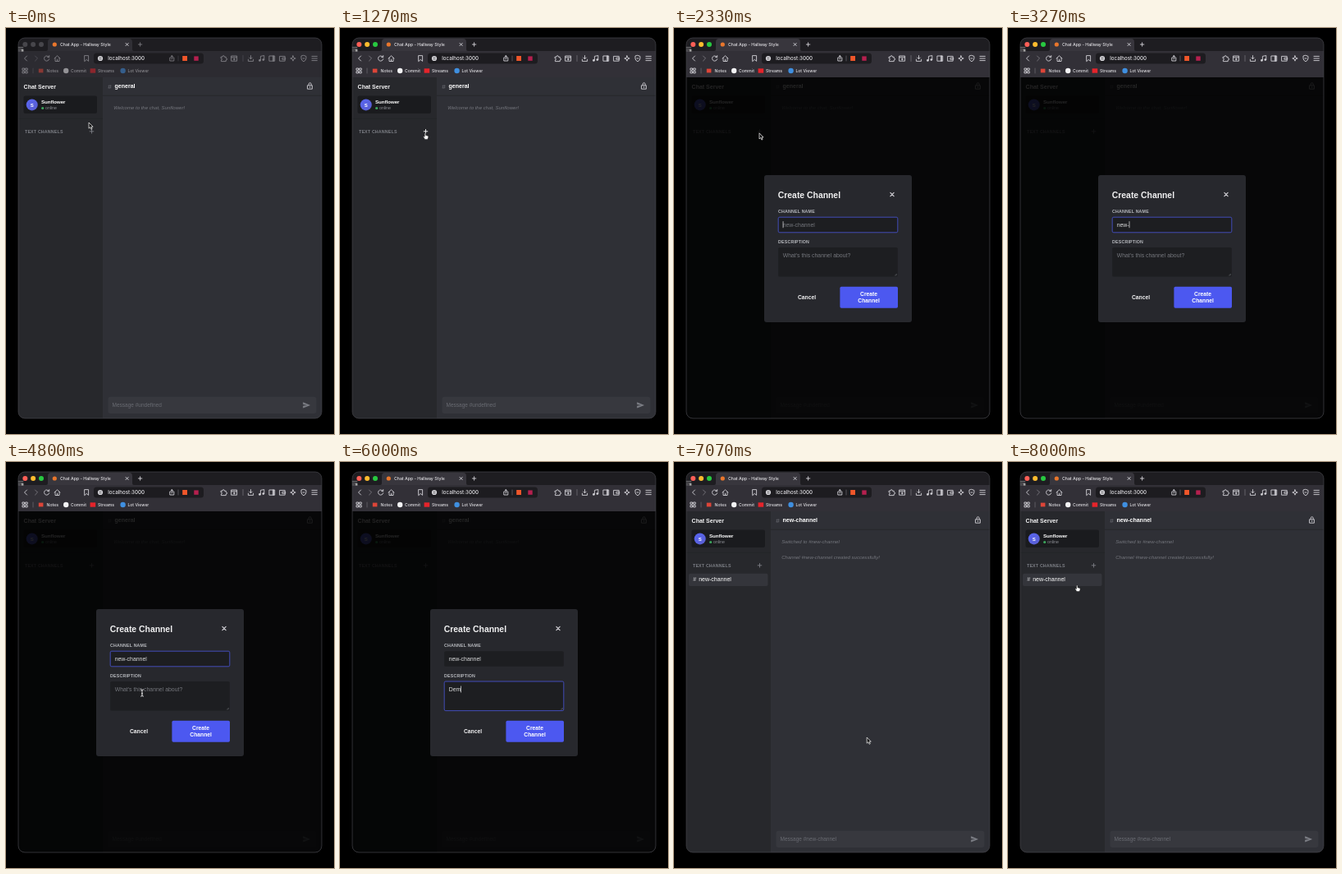
An HTML page for the animation above (8070 ms loop, 400 by 494 pixels).

```html
<!DOCTYPE html>
<html lang="en">
<head>
<meta charset="utf-8">
<title>Chat App</title>
<style>
  html, body { margin: 0; width: 100%; height: 100%; overflow: hidden; background: #000; }
  svg { display: block; width: 100vw; height: 100vh; }
  text { font-family: "Liberation Sans", Arial, sans-serif; white-space: pre; }
  .ui text { font-family: Inter, Roboto, sans-serif; font-weight: 500; fill: #e4e3e7; }
  .b { font-weight: 700; }
  .note { font-size: 6.05px; font-style: italic; fill: #74767d; }
  .label { font-size: 5.25px; font-weight: 700; letter-spacing: .2px; }
  .field { font-size: 6.9px; fill: #dcddde; }
  .hint { fill: #75777d; }
  .line { fill: none; stroke: #d2d1d6; stroke-width: .9; stroke-linecap: round; stroke-linejoin: round; }
  .box { fill: #1d1e21; stroke: #4b57dc; stroke-width: .8; }
</style>
</head>
<body>
<svg viewBox="0 0 400 494">
  <defs>
    <clipPath id="frame"><rect x="15" y="12" width="370" height="463" rx="8"/></clipPath>
    <linearGradient id="avatar" x1="0" y1="0" x2="1" y2="1">
      <stop offset="0" stop-color="#5865f2"/><stop offset="1" stop-color="#5a5fd0"/>
    </linearGradient>
  </defs>

  <g clip-path="url(#frame)">
    <!-- browser chrome -->
    <rect x="15" y="12" width="370" height="49" fill="#1e1d21"/>
    <rect id="bar" x="15" y="28" width="370" height="33"/>
    <path id="tab" d="M49 28q2 0 2-2v-9q0-4 4-4h95q4 0 4 4v9q0 2 2 2z"/>
    <rect x="107" y="30.5" width="134" height="13" rx="3.5" fill="#1d1c20"/>
    <g class="ui">
      <g id="lights">
        <circle cx="23.3" cy="20" r="3"/><circle cx="33.1" cy="20" r="3"/><circle cx="43" cy="20" r="3"/>
      </g>
      <circle cx="59.3" cy="20" r="2.6" fill="#e8762c"/>
      <text x="66" y="21.9" font-size="5.2">Chat App - Hallway Style</text>
      <path class="line" d="M146 18.4l3.2 3.2m0-3.2l-3.2 3.2"/>
      <text x="124.3" y="39.2" font-size="6.2">localhost:3000</text>
      <circle cx="115" cy="37" r="3.1" fill="#dad9de"/>
      <path d="M113.4 36h3.2M113.4 38h3.2" stroke="#222" stroke-width=".6"/>
      <rect x="215.2" y="34" width="5.8" height="6" fill="#f0562a"/>
      <rect x="229.3" y="34.4" width="5.4" height="5.4" fill="#b5204f"/>

      <g id="icons">
        <g class="line">
          <path d="M161.4 20h4.4M163.6 17.8v4.4"/>
          <path d="M25.5 34l-3 3 3 3"/>
          <path d="M35.5 34l3 3-3 3" opacity=".45"/>
          <path d="M52.2 35.2a3.1 3.1 0 1 0 .5 2.6M52.7 33.6v2h-2"/>
          <path d="M59 37l3.5-3.2L66 37M60 36.5v4h5v-4M62.5 40.2v-2"/>
          <path d="M96 33.6h4.6v6.8l-2.3-2-2.3 2z"/>
          <path d="M201 36h-1.2v4h5v-4h-1.2M202.3 38v-4.4m-1.2 1.2l1.2-1.2 1.2 1.2"/>
          <path d="M210 34v6" opacity=".35"/>
          <path d="M262.4 35.2h1.6q0-1.6 1.2-1.6t1.2 1.6h1.8v1.6q1.4 0 1.4 1.1t-1.4 1.1v1.6h-5.8v-1.6q1 0 1-1.1t-1-1.1z"/>
          <path d="M275 34h6.6v6.2H275zM275 35.8h6.6M278.3 37v2m-1-1h2"/>
          <path d="M289 33.5v7" opacity=".35"/>
          <path d="M298.5 33.6v4m-1.8-1.6l1.8 1.8 1.8-1.8M295.4 38.2v2.2h6.2v-2.2"/>
          <path d="M310.4 39.4v-5l4.4-.9v5"/>
          <path d="M321.3 34h6.4v6.2h-6.4zM325.4 34v6.2M326.5 34v6.2"/>
          <path d="M334 34.4h6.2v5.8H334zM337.3 36.3h3.4v2h-3.4z"/>
          <path d="M350 33.8l.8 2.3 2.4.9-2.4.9-.8 2.3-.8-2.3-2.4-.9 2.4-.9z"/>
          <path d="M363 33.4l3 1v2.5q0 2.5-3 3.9-3-1.4-3-3.9v-2.5zM362 37h2"/>
          <path d="M373 34.4h6.4M373 37h6.4M373 39.6h6.4"/>
          <path d="M20.3 49h2.2v2.2h-2.2zm3.7 0h2.2v2.2H24zm-3.7 3.7h2.2v2.2h-2.2zm3.7 0h2.2v2.2H24z"/>
          <path d="M33 49v6" opacity=".3"/>
        </g>
        <circle cx="309.4" cy="39.4" r="1.3" fill="#d2d1d6"/>
        <circle cx="313.8" cy="38.6" r="1.3" fill="#d2d1d6"/>
        <rect x="39.8" y="49.6" width="5.6" height="4.8" fill="#dd4538"/>
        <circle cx="73.2" cy="52" r="3.2" fill="#f2f2f4"/>
        <rect x="102.6" y="49.3" width="6.6" height="5.4" fill="#e5242b"/>
        <circle cx="142.6" cy="52" r="3.2" fill="#3f8fe0"/>
        <g font-size="5.1">
          <text x="49.6" y="53.8">Notes</text>
          <text x="79" y="53.8">Commit</text>
          <text x="112" y="53.8">Streams</text>
          <text x="148.4" y="53.8">Lot Viewer</text>
        </g>
      </g>
    </g>

    <!-- page -->
    <rect x="118" y="60" width="267" height="415" fill="#2f3036"/>
    <rect x="15" y="60" width="103" height="415" fill="#27282c"/>
    <path d="M118 82.3h267M15 110.3h103" stroke="#232428" stroke-width=".7"/>
    <text class="b" x="21.6" y="74.2" font-size="7" fill="#f4f4f5">Chat Server</text>
    <rect x="21.5" y="82.5" width="89.5" height="21.5" rx="2" fill="#1a1b1e"/>
    <circle cx="31.7" cy="93.4" r="7" fill="url(#avatar)"/>
    <text class="b" x="31.7" y="95.6" font-size="6" fill="#fff" text-anchor="middle">S</text>
    <text class="b" x="43" y="92" font-size="6.1" fill="#fff">Sunflower</text>
    <circle cx="44.7" cy="97.5" r="1.6" fill="#3ba55c"/>
    <text x="48" y="99.3" font-size="5.2" fill="#8b8d93">online</text>
    <text class="label" x="23" y="127.9" fill="#7c7e85">TEXT CHANNELS</text>
    <path id="plus" class="line" d="M102.2 125.8h4.6M104.5 123.5v4.6"/>
    <g id="row">
      <rect x="18" y="135.8" width="96.5" height="15.2" rx="2" fill="#34353b"/>
      <text x="23.2" y="145.3" font-size="7" fill="#d4d5d8">#</text>
      <text x="30.2" y="145.3" font-size="7" fill="#fff">new-channel</text>
    </g>
    <text x="124.3" y="73.6" font-size="8" fill="#72747b">#</text>
    <text id="heading" class="b" x="132.6" y="73.4" font-size="7" fill="#fff"></text>
    <path class="line" d="M368 69.8h5.4v4.4H368zM369.2 69.6v-1.2q0-1.7 1.5-1.7t1.5 1.7v1.2M370.7 71.5v.9"/>
    <text id="note1" class="note" x="131.2" y="99"></text>
    <text id="note2" class="note" x="131.2" y="118.3"></text>
    <rect x="124.5" y="448.7" width="254" height="20.3" rx="3" fill="#37383e"/>
    <text id="message" x="129.5" y="461.2" font-size="6.5" fill="#696b72"></text>
    <path d="M362.2 455.2l9 3.7-9 3.7v-2.9l5-.8-5-.8z" fill="#7b7d84"/>

    <!-- dialog -->
    <g id="modal">
      <rect x="15" y="60" width="370" height="415" fill="#000" opacity=".86"/>
      <rect x="110" y="179" width="180" height="179" rx="3" fill="#27282d"/>
      <text class="b" x="126.8" y="206.6" font-size="10.4" fill="#f0f0f1">Create Channel</text>
      <path class="line" d="M263.9 200.4l4.2 4.2m0-4.2l-4.2 4.2" style="stroke-width:1.2"/>
      <g fill="#b7b9be">
        <text class="label" x="127" y="225.2">CHANNEL NAME</text>
        <text class="label" x="127" y="262.3">DESCRIPTION</text>
      </g>
      <rect id="nameBox" class="box" x="127.2" y="230.2" width="145.6" height="18.6" rx="1.6"/>
      <rect id="descBox" class="box" x="127.2" y="267" width="145.6" height="35.6" rx="1.6"/>
      <path d="M269.3 301.4l2.4-2.4m-1 2.4l1-1" stroke="#85878c" stroke-width=".5"/>
      <text id="name" class="field" x="132.7" y="241.6"></text>
      <text id="desc" class="field" x="132.7" y="279"></text>
      <rect id="caret" width=".7" height="8" fill="#e6e6e8"/>
      <text class="b" x="162" y="329.7" font-size="6.75" fill="#f2f2f3" text-anchor="middle">Cancel</text>
      <rect id="button" x="202.4" y="314.8" width="70.6" height="26" rx="1.8"/>
      <g class="b" font-size="6.75" fill="#fff" text-anchor="middle">
        <text x="237.6" y="325.8">Create</text>
        <text x="237.6" y="333.9">Channel</text>
      </g>
    </g>
  </g>

  <rect x="15" y="12" width="370" height="463" rx="8" fill="none" stroke="#46464b" stroke-width=".7"/>
  <path d="M14.8 23.5h6.4M14.8 25.7h6.4M14.8 27.8h3" stroke="#8a8a8c" stroke-width=".8"/>
  <rect x="18.6" y="26.2" width="2.8" height="2.4" fill="#aaa"/>

  <g id="cursor">
    <path id="arrow" d="M0 0v7.2l1.7-1.5 1.2 2.6 1.2-.6-1.2-2.5h2.2z" fill="#111" stroke="#fff" stroke-width=".7"/>
    <path id="hand" d="M-.8.4q.8-.9 1.4 0v2.4l2.4.6q.9.3.8 1.2l-.4 1.7-.7 1.3H-.4L-2.2 4.9q-.5-1 .4-1l1 .7z" fill="#fff" stroke="#222" stroke-width=".5"/>
    <path id="beam" d="M-1.8-4.2q1.8 0 1.8 1.2V3q0 1.2-1.8 1.2M1.8-4.2Q0-4.2 0-3M0 3q0 1.2 1.8 1.2M-.9.8H.9" fill="none" stroke="#f2f2f2" stroke-width=".9"/>
  </g>
</svg>
<script>
  const LOOP = 8070, FOCUS = 735, OPEN = 1330, SWITCH = 4970, CLOSE = 7070;
  const NAME_KEYS = [2800, 2870, 3000, 3270, 3470, 3530, 3670, 3800, 3870, 4000, 4130];
  const DESC_KEYS = [5800, 5870, 6000, 6070];
  const PATH = [
    [0, 101, 115], [870, 104, 127.8], [4400, 104, 127.8], [4760, 166, 281],
    [SWITCH, 166, 281], [5200, 262, 281], [6400, 262, 281], [6960, 235.2, 335],
    [7330, 235.2, 335], [7530, 150, 193], [7800, 150, 193], [7990, 84.3, 150]
  ];
  const SHAPES = [
    [0, 'arrow'], [FOCUS, 'hand'], [OPEN, 'arrow'], [2800, ''], [4440, 'arrow'], [4660, 'beam'],
    [5800, ''], [6440, 'beam'], [6660, 'arrow'], [6800, 'hand'], [CLOSE, 'arrow'], [7930, 'hand']
  ];
  const LIGHTS = ['#fe5f57', '#febc2e', '#28c840'];

  const $ = id => document.getElementById(id);
  const clamp = v => Math.max(0, Math.min(1, v));
  const ease = p => p * p * (3 - 2 * p);
  const show = (id, on) => { $(id).style.display = on ? '' : 'none'; };
  const paint = (id, color) => { $(id).style.fill = color; };
  const write = (id, s) => { if ($(id).textContent !== s) $(id).textContent = s; };
  const typed = (s, keys, t) => s.slice(0, keys.filter(k => k <= t).length);

  function cursorAt(t) {
    const i = PATH.findIndex(p => p[0] > t);
    if (i < 0) return PATH[PATH.length - 1].slice(1);
    const [t0, x0, y0] = PATH[i - 1], [t1, x1, y1] = PATH[i];
    const p = ease((t - t0) / (t1 - t0));
    return [x0 + (x1 - x0) * p, y0 + (y1 - y0) * p];
  }

  function drawFields(t) {
    const name = typed('new-channel', NAME_KEYS, t), desc = typed('Demo', DESC_KEYS, t);
    write('name', name || 'new-channel');
    write('desc', desc || "What's this channel about?");
    $('name').classList.toggle('hint', !name);
    $('desc').classList.toggle('hint', !desc);

    const moved = clamp((t - SWITCH) / 130);
    $('nameBox').style.strokeOpacity = clamp((t - OPEN) / 200) * (1 - moved);
    $('descBox').style.strokeOpacity = moved;

    const inDesc = t >= SWITCH, value = inDesc ? desc : name;
    const resets = [OPEN, ...NAME_KEYS, SWITCH, ...DESC_KEYS].filter(k => k <= t);
    const idle = t - resets[resets.length - 1];
    const width = value ? $(inDesc ? 'desc' : 'name').getComputedTextLength() : 0;
    $('caret').setAttribute('x', 132.7 + width);
    $('caret').setAttribute('y', inDesc ? 272.5 : 235.2);
    show('caret', idle % 1000 < 500);
    paint('button', t >= 6800 ? '#3d46bb' : '#4c58f0');
  }

  function draw(t) {
    const active = t >= FOCUS, done = t >= CLOSE, open = t >= OPEN && !done;
    paint('bar', active ? '#323037' : '#2c2b31');
    paint('tab', active ? '#38363d' : '#302f35');
    [...$('lights').children].forEach((c, i) => { c.style.fill = active ? LIGHTS[i] : '#47464b'; });
    $('icons').style.opacity = active ? 1 : .52;
    $('plus').style.stroke = active && t < OPEN ? '#fff' : '#7c7e85';

    const room = done ? 'new-channel' : 'general';
    write('heading', room);
    write('message', 'Message #' + (done ? room : 'undefined'));
    write('note1', done ? 'Switched to #new-channel' : 'Welcome to the chat, Sunflower!');
    write('note2', done ? 'Channel #new-channel created successfully!' : '');
    show('row', done);
    show('modal', open);
    if (open) drawFields(t);

    const shape = SHAPES.filter(s => s[0] <= t).pop()[1];
    for (const id of ['arrow', 'hand', 'beam']) show(id, id === shape);
    $('cursor').setAttribute('transform', `translate(${cursorAt(t)})`);
  }

  const start = performance.now();
  function tick() {
    draw((performance.now() - start) % LOOP);
    requestAnimationFrame(tick);
  }
  tick();
</script>
</body>
</html>
```
